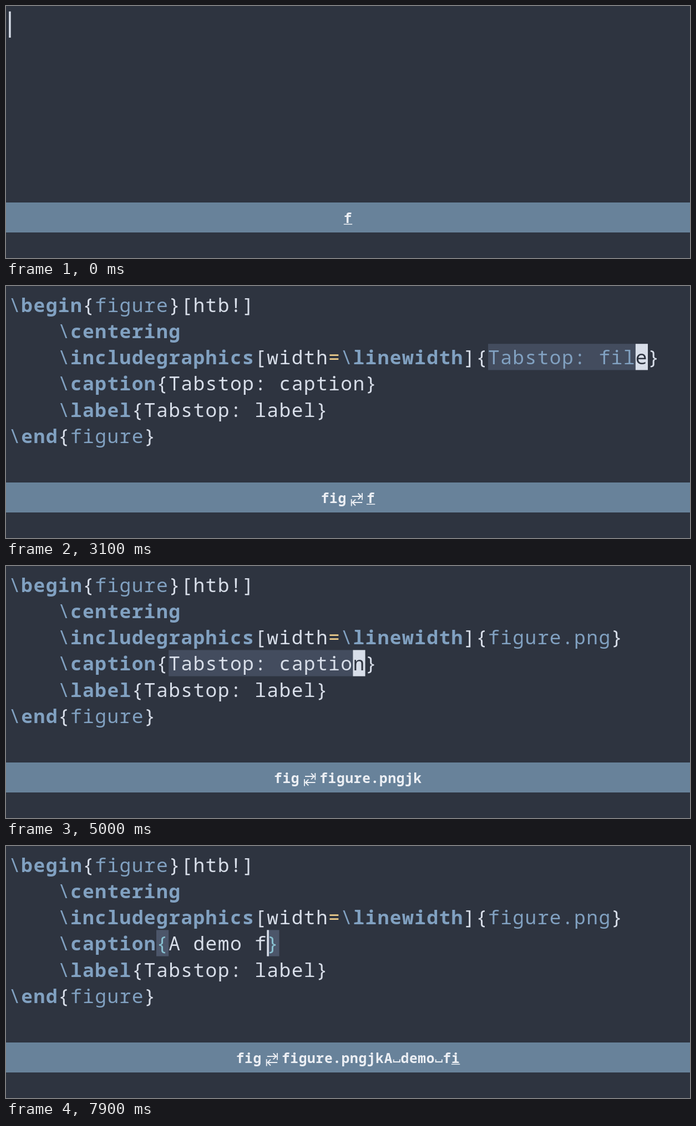
An HTML page that plays this animation: 1233x454 px, repeating every 8000 ms.

```html
<!DOCTYPE html>
<html lang="en">
<head>
<meta charset="utf-8">
<title>Snippet typing</title>
<style>
  html, body { margin: 0; width: 100%; height: 100%; overflow: hidden; background: #2e3440; }
  svg { display: block; width: 100vw; height: 100vh; }
  text { font-family: "Noto Sans Mono", "DejaVu Sans Mono", monospace; white-space: pre; font-variant-ligatures: none; }
</style>
</head>
<body>
<svg id="stage" viewBox="0 0 1233 454" preserveAspectRatio="none"></svg>
<script>
const stage = document.getElementById('stage');
const LOOP = 8000, EXPAND = 1700, JUMP = 4800, HOLD = 200;
const CELL = 22.15, LEFT = 5.2, TOP = 9.8, ROW = 47.2;
const KEY_CELL = 15.4, TAB = '\t';
const C = {
  bg: '#2e3440', fg: '#d8dee9', blue: '#81a1c1', yellow: '#ebcb8b', teal: '#88c0d0',
  selection: '#434c5e', match: '#4c566a', bar: '#68829a', key: '#eceff4'
};

// [time, key, delay before the editor shows it]
const KEYS = [
  [0, 'f', 200], [600, 'i'], [1000, 'g'], [1700, TAB],
  [3100, 'f', 100], [3200, 'i'], [3400, 'g'], [3500, 'u'], [3600, 'r'], [3800, 'e'], [3900, '.'],
  [4100, 'p', 100], [4300, 'n'], [4500, 'g', 100], [4800, 'j'], [4800, 'k'],
  [5900, 'A'], [6200, ' '], [6600, 'd'], [6800, 'e', 100], [7000, 'm'], [7100, 'o'],
  [7600, ' '], [7700, 'f'], [7900, 'i', 100]
];

const colX = col => LEFT + col * CELL;
const rowY = row => TOP + row * ROW;
const rect = (x, y, w, h, fill) =>
  `<rect x="${x}" y="${y}" width="${w}" height="${h}" fill="${fill}"/>`;
const cells = (col, row, count, fill) => rect(colX(col), rowY(row), count * CELL, ROW, fill);
const caret = (col, row) => rect(colX(col), rowY(row), 3.5, ROW, C.fg);

function glyphs(str, x, y, step, size, fill, weight) {
  const xs = [...str].map((_, i) => (x + i * step).toFixed(2)).join(' ');
  return `<text x="${xs}" y="${y}" font-size="${size}" font-weight="${weight}" fill="${fill}">${str}</text>`;
}
const code = (str, col, row, fill = C.fg, weight = 400) =>
  str ? glyphs(str, colX(col), rowY(row) + 37, CELL, 34.6, fill, weight) : '';
const command = (name, col, row) =>
  code('\\', col, row, C.blue, 500) + code(name, col + 1, row, C.blue, 600);

const typedBetween = (from, to, t) => KEYS
  .filter(([at, , lag = 0]) => at >= from && at < to && at + lag <= t)
  .map(k => k[1]).join('');

// A snippet field with its braces: plain, selected or being typed.
function field(text, col, row, color, mode) {
  const end = col + 1 + text.length;
  let out = '';
  if (mode === 'select') {
    out += cells(col + 1, row, text.length - 1, C.selection) + cells(end - 1, row, 1, C.fg);
    out += code(text.slice(0, -1), col + 1, row, color) + code(text.slice(-1), end - 1, row, C.bg);
  } else {
    if (mode === 'type') out += cells(col, row, 1, C.match) + cells(end, row, 1, C.match);
    out += code(text, col + 1, row, color);
  }
  const brace = mode === 'type' ? C.teal : C.fg;
  out += code('{', col, row, brace) + code('}', end, row, brace);
  return mode === 'type' ? out + caret(end, row) : out;
}

function editor(t) {
  if (t < EXPAND) {
    const word = typedBetween(0, EXPAND, t);
    return code(word, 0, 0) + caret(word.length, 0);
  }
  const file = typedBetween(EXPAND + 1, JUMP, t);
  const caption = typedBetween(JUMP + 1, LOOP, t);
  const fileMode = t >= JUMP ? '' : file ? 'type' : 'select';
  const captionMode = t < JUMP ? '' : caption ? 'type' : 'select';
  return command('begin', 0, 0) + field('figure', 6, 0, C.blue) + code('[htb!]', 14, 0) +
    command('centering', 4, 1) +
    command('includegraphics', 4, 2) + code('[width', 20, 2) + code('=', 26, 2, C.yellow) +
    command('linewidth', 27, 2) + code(']', 37, 2) +
    field(file || 'Tabstop: file', 38, 2, C.blue, fileMode) +
    command('caption', 4, 3) + field(caption || 'Tabstop: caption', 12, 3, C.fg, captionMode) +
    command('label', 4, 4) + field('Tabstop: label', 10, 4, C.fg) +
    command('end', 0, 5) + field('figure', 4, 5, C.blue);
}

const icon = (x, y, d, width) =>
  `<path transform="translate(${x} ${y})" d="${d}" fill="none" stroke="${C.key}" stroke-width="${width}"/>`;
const tabIcon = x => icon(x, 372,
  'M20.3 1V13.5M2 7H18.5M13 1.5L18.5 7L13 12.5M1 12V24.5M20.5 18H2.8M8.3 12.5L2.8 18L8.3 23.5', 1.9);
const spaceIcon = x => icon(x, 389, 'M1.6 -4.5V0H12.8V-4.5', 1.9);

const keyWidth = key => key === TAB ? 36 : key === ' ' ? 14.4 : KEY_CELL;

function keyBar(t) {
  const shown = KEYS.filter(k => k[0] <= t);
  let x = 616.5 - shown.reduce((sum, k) => sum + keyWidth(k[1]), 0) / 2;
  let out = rect(0, 354, 1233, 54, C.bar);
  for (const [at, key] of shown) {
    const fresh = t - at < HOLD, width = keyWidth(key);
    if (key === TAB) {
      out += tabIcon(x + 7.8);
      if (fresh) out += rect(x + 8, 393.5, 25, 1.8, C.key);
    } else if (key === ' ') {
      out += spaceIcon(x);
      if (fresh) out += rect(x, 395.2, width, 1.5, C.key);
    } else {
      out += glyphs(key, x, 390.6, KEY_CELL, 24.4, C.key, 700);
      if (fresh) out += rect(x, 392.4, width, 1.5, C.key);
    }
    x += width;
  }
  return out;
}

let last = '';
function draw(t) {
  const picture = rect(0, 0, 1233, 454, C.bg) + editor(t) + keyBar(t);
  if (picture !== last) stage.innerHTML = last = picture;
}

const start = performance.now();
function tick() {
  draw((performance.now() - start) % LOOP);
  requestAnimationFrame(tick);
}
tick();
</script>
</body>
</html>
```
